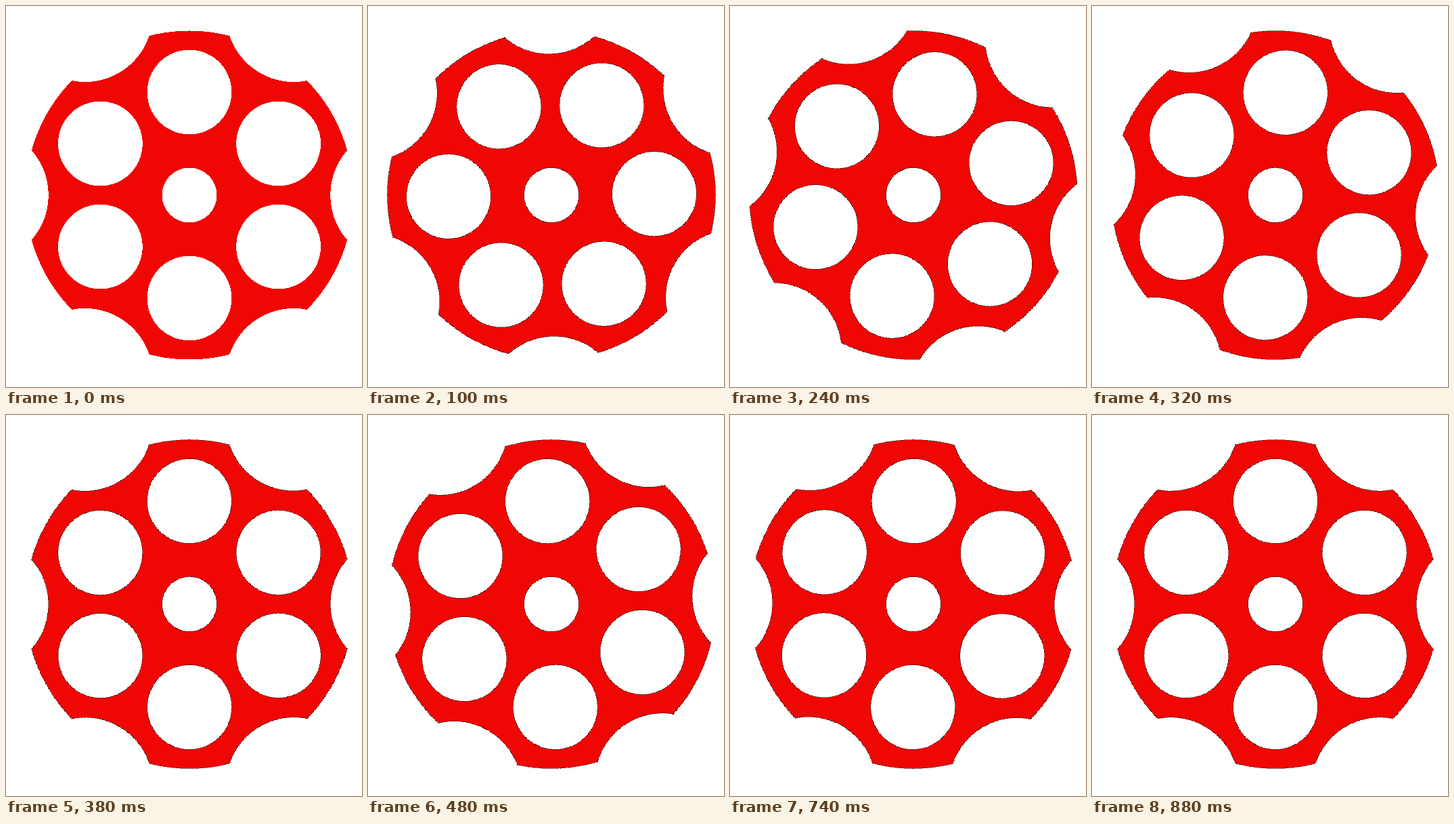
Animation, 526 px wide and 562 px high, one loop 980 ms. Source, as an HTML page:

```html
<!DOCTYPE html>
<html lang="en">
<head>
<meta charset="utf-8">
<title>Revolving cylinder</title>
<style>
  html, body { margin: 0; width: 100%; height: 100%; overflow: hidden; background: #fff; }
  svg { display: block; width: 526px; height: 562px; }
  path { fill: #f00603; fill-rule: evenodd; shape-rendering: crispEdges; }
  .edge { stroke: #111; stroke-width: 1; stroke-dasharray: 1 1; }
</style>
</head>
<body>
<svg viewBox="0 0 526 562"><path id="cylinder"/></svg>
<script>
  const LOOP = 980, STEP = 20, FIRST = 40, LAST = 880;
  const TURN = 60, DELAY = 24, DAMPING = 7.5, FREQ = 14.6;
  const RIM = 242.4, NOTCH = 100, CORNER = 15.83;
  const HOLE = 62.4, HUB = 40.5, ORBIT = 152;
  const cylinder = document.getElementById('cylinder');

  const polar = (r, deg) => {
    const a = deg * Math.PI / 180;
    return [r * Math.cos(a), r * Math.sin(a)];
  };
  const point = (r, deg) => polar(r, deg).map(v => v.toFixed(2)).join(' ');
  const circle = (x, y, r) =>
    `M${x - r} ${y}a${r} ${r} 0 1 0 ${2 * r} 0a${r} ${r} 0 1 0 ${-2 * r} 0Z`;

  function outline() {
    let rim = 'M' + point(RIM, -CORNER), holes = circle(0, 0, HUB);
    for (let a = 0; a < 360; a += 60) {
      rim += `A${NOTCH} ${NOTCH} 0 0 0 ${point(RIM, a + CORNER)}`;
      rim += `A${RIM} ${RIM} 0 0 1 ${point(RIM, a + 60 - CORNER)}`;
      holes += circle(...polar(ORBIT, a + 30), HOLE);
    }
    return rim + 'Z' + holes;
  }

  // Damped spring released from rest, settling one chamber further on.
  function angleAt(ms) {
    if (ms < FIRST || ms >= LAST) return 0;
    const s = (ms - DELAY) / 1000, w = FREQ * s;
    const swing = Math.cos(w) + DAMPING / FREQ * Math.sin(w);
    return TURN * (1 - Math.exp(-DAMPING * s) * swing);
  }

  const start = performance.now();
  function draw() {
    const elapsed = Math.max(0, performance.now() - start) % LOOP;
    const ms = Math.floor(elapsed / STEP) * STEP;
    cylinder.setAttribute('transform', `translate(271 279) rotate(${angleAt(ms).toFixed(3)})`);
    cylinder.classList.toggle('edge', ms >= FIRST);
    requestAnimationFrame(draw);
  }

  cylinder.setAttribute('d', outline());
  draw();
</script>
</body>
</html>
```
